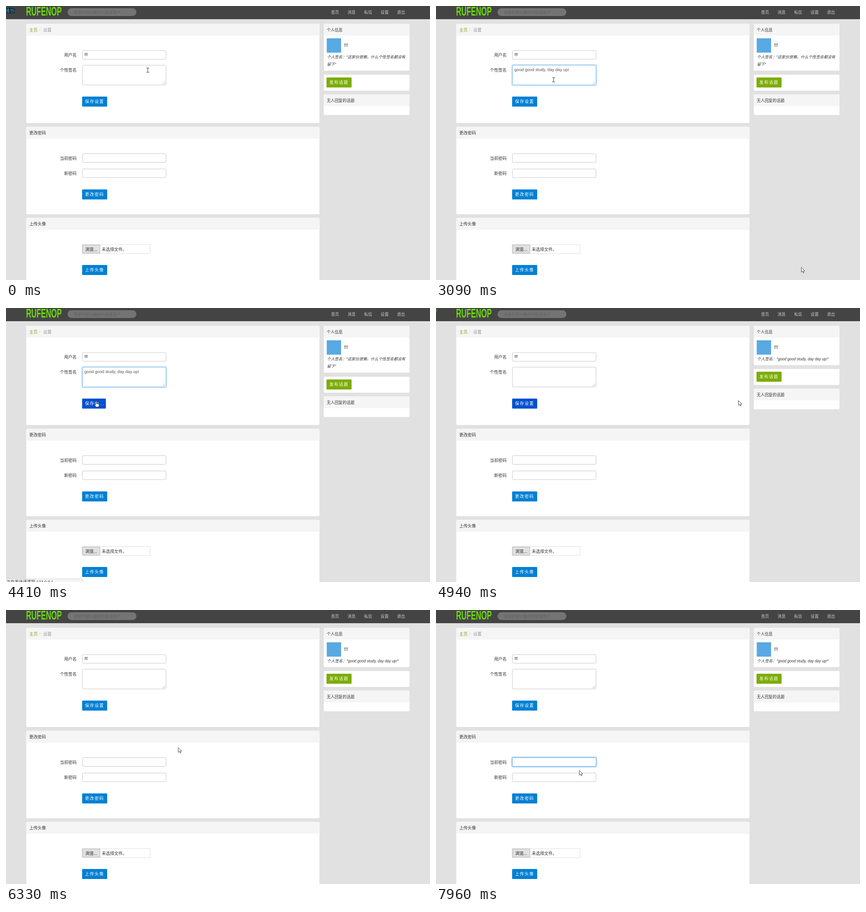
Recreate the animation shown at these times as an HTML page. Size 930 px wide and 602 px high, loop 8000 ms.

```html
<!DOCTYPE html>
<html lang="zh-CN">
<head>
<meta charset="utf-8">
<style>
html, body { margin: 0; width: 100%; height: 100%; overflow: hidden; background: #e1e1e1; }
svg { position: fixed; left: 0; top: 0; display: block; }
text { font-family: "Liberation Sans", "Noto Sans CJK SC", "Noto Sans CJK", sans-serif; white-space: pre; }
.cjk { font-family: "Noto Sans CJK SC", "Noto Sans CJK", sans-serif; }
</style>
</head>
<body>
<svg id="stage" width="930" height="602" viewBox="0 0 930 602"></svg>
<script>
const LOOP = 8000, STEP = 77.2;
const stage = document.getElementById('stage');

function el(tag, attrs, parent = stage) {
  const node = document.createElementNS('http://www.w3.org/2000/svg', tag);
  for (const key in attrs) node.setAttribute(key, attrs[key]);
  return parent.appendChild(node);
}
const group = (parent = stage) => el('g', {}, parent);
const show = (node, on) => node.setAttribute('visibility', on ? 'visible' : 'hidden');

function rect(x, y, width, height, fill, extra = {}, parent) {
  return el('rect', { x, y, width, height, fill, ...extra }, parent);
}
function text(x, y, str, size, fill, extra = {}, parent) {
  const node = el('text', { x, y, 'font-size': size, fill, ...extra }, parent);
  node.textContent = str;
  return node;
}
function card(x, y, w, h, title, parent) {
  rect(x, y, w, h, '#fff', { rx: 2 }, parent);
  if (title === undefined) return;
  el('path', { d: `M${x} ${y + 26}v-24q0-2 2-2h${w - 4}q2 0 2 2v24z`, fill: '#f5f5f5' }, parent);
  text(x + 6.5, y + 16.5, title, x > 600 ? 8.7 : 9.2, '#333', {}, parent);
}
function button(x, y, label, fill, parent) {
  const box = rect(x, y, 55, 22, fill, { rx: 1.5 }, parent);
  const caption = text(x + 6.3, y + 14.4, label, 9.2, '#fff', { 'letter-spacing': 1.3 }, parent);
  return { box, caption };
}
function field(y, h) {
  const glow = rect(166, y - 1.5, 186.5, h + 3, 'none', { rx: 3.5, stroke: '#66afe9', 'stroke-width': 2.5, opacity: 0 });
  const box = rect(167.5, y, 183.5, h, '#fff', { rx: 2.5, stroke: '#c8c8c8', 'stroke-width': 1 });
  return { glow, box };
}
const label = (y, str) => text(155, y, str, 9.2, '#333', { 'text-anchor': 'end' });

// Top bar
rect(0, 0, 930, 29, '#444');
el('text', { transform: 'translate(44 20.5) scale(1 1.7)', 'font-size': 16, 'font-weight': 700, fill: '#6bdc0c' })
  .textContent = 'RUFENOP';
rect(135, 5, 151, 17, '#747474', { rx: 8.5 });
text(149, 16.5, '搜索你感兴趣的内容或用户', 8.5, '#616161');
['首页', '消息', '私信', '设置', '退出'].forEach((s, i) => text(713 + i * 36.2, 16.8, s, 8.8, '#ccc'));
const hint = text(-1.5, 13.8, '播放', 10, '#38a9de', { stroke: '#111', 'stroke-width': 2, 'paint-order': 'stroke' });
const spark = el('path', { d: 'M0 3.5h2M0 6.5h2', stroke: '#35d43a', 'stroke-width': 1.4 });

// Profile form
card(44.5, 39, 643, 218, '');
text(51, 55.5, '主页', 9.2, '#80ab1c');
text(73, 55.5, '/', 9.2, '#ccc');
text(81.5, 55.5, '设置', 9.2, '#999');
label(110.5, '用户名');
field(98, 19);
text(172, 110.3, 'fff', 9.2, '#555');
label(144, '个性签名');
const area = field(130, 43.5);
el('path', { d: 'M343 172l6-6M346 172l3-3', stroke: '#aaa', 'stroke-width': 0.8 });
const motto = 'good good study, day day up!';
const typed = text(172, 143.2, motto, 9.2, '#555');
const save = button(167, 199, '保存设置', '#0080d4');

// Password form
card(44.5, 265.5, 643, 192, '更改密码');
label(337.5, '当前密码');
const oldPass = field(324.5, 19);
label(370.5, '新密码');
field(358, 19);
button(167, 403, '更改密码', '#0080d4');

// Upload form
card(44.5, 465.5, 643, 150, '上传头像');
rect(167, 524, 149, 20, '#fff', { stroke: '#ddd', rx: 1 });
rect(168, 525, 38, 18, '#e1e1e1', { stroke: '#adadad', 'stroke-width': 0.9 });
text(174, 537.5, '浏览...', 9.2, '#111');
text(210, 537.5, '未选择文件。', 9.1, '#333');
button(167, 569, '上传头像', '#0080d4');

// Sidebar
const infoLong = group(), infoShort = group(), lower = group();
const slant = { 'font-style': 'italic' };
card(697, 39, 188, 103, '个人信息', infoLong);
card(697, 39, 188, 86.5, '个人信息', infoShort);
text(704, 114.8, '个人签名:"这家伙很懒,什么个性签名都没有'.replace(/[:,]/g, c => c === ':' ? '：' : '，'),
  8.45, '#333', slant, infoLong);
text(704, 131.3, '留下"', 8.45, '#333', slant, infoLong);
text(704, 114.8, '个人签名：', 8.6, '#333', slant, infoShort);
text(747, 114.8, `"${motto}"`, 8.3, '#333', slant, infoShort);
rect(703.5, 71, 31.5, 31.5, '#58a9e4');
text(741, 90, 'fff', 11.5, '#777');
card(697, 151, 188, 35, undefined, lower);
button(703, 157, '发布话题', '#7cad05', lower);
card(697, 194, 188, 45.5, '无人回复的话题', lower);

// Status bar
const status = group();
rect(-2, 595, 170.5, 12, '#f4f4f4', { stroke: '#ccc', 'stroke-width': 0.8 }, status);
text(1, 605, '正在发送请求到 127.0.0.1...', 9, '#333', {}, status);

// Carets and pointers
const caretA = rect(172, 134, 1, 11, '#222');
const caretB = rect(172, 328, 1, 12, '#222');
const ARROW = 'M.4.4V10.8L2.9 8.6 4.6 12.5 6.3 11.8 4.7 8H8z';
const arrowStyle = { d: ARROW, fill: '#fff', stroke: '#222', 'stroke-width': 0.8 };
const ghost = el('path', { ...arrowStyle, transform: 'translate(801 574)' });
const pointer = group();
const shapes = {
  arrow: el('path', arrowStyle, pointer),
  beam: el('path', { d: 'M-3-4.8h2.2L0-4.2.8-4.8H3M0-4.2V4.2M-3 4.8h2.2L0 4.2.8 4.8H3', fill: 'none', stroke: '#333', 'stroke-width': 1 }, pointer),
  hand: el('path', {
    d: 'M-1.2.7q0-1 1-1t1 1V5l4.2 1q1.6.5 1.3 2L5.4 12.5H-.3L-3.4 8.2q-.4-1.4 1-1.1l1.2 1z',
    fill: '#fff', stroke: '#222', 'stroke-width': 0.8
  }, pointer)
};

// time, x, y
const path = [
  [0, 311, 141], [380, 311, 141], [460, 330, 150], [830, 801, 574], [1150, 789, 114], [1310, 777, 112],
  [1460, 777, 112], [1770, 757, 112], [1930, 757, 112], [2390, 258, 162], [3080, 258, 162], [3160, 258, 162],
  [3860, 200, 208], [4010, 198, 205], [4560, 198, 205], [4900, 663, 203], [4990, 663, 203], [5790, 790, 112],
  [6020, 790, 112], [6310, 377.5, 302], [6390, 377.5, 302], [6770, 305, 335], [7640, 305, 335],
  [7800, 324, 343], [7930, 314, 352], [8000, 314, 352]
];
const clamp = v => Math.max(0, Math.min(1, v));
const ramp = (t, from, to) => clamp((t - from) / (to - from));
const ease = p => p * p * (3 - 2 * p);
const between = (t, from, to) => t >= from && t < to;

function locate(t) {
  const i = Math.max(1, path.findIndex(k => k[0] >= t));
  const [t0, x0, y0] = path[i - 1], [t1, x1, y1] = path[i];
  const p = ease(ramp(t, t0, t1));
  return [x0 + (x1 - x0) * p, y0 + (y1 - y0) * p];
}
const inside = (x, y, l, t, r, b) => x >= l && x <= r && y >= t && y <= b;
function kindAt(x, y) {
  if (inside(x, y, 167, 199, 222, 221)) return 'hand';
  const editable = inside(x, y, 167, 130, 351, 174) || inside(x, y, 167, 324, 351, 344);
  return editable || inside(x, y, 704, 106, 876, 118) ? 'beam' : 'arrow';
}
function mix(a, b, p) {
  return `rgb(${a.map((v, i) => Math.round(v + (b[i] - v) * p))})`;
}
function focus(f, p, strength) {
  f.box.setAttribute('stroke', mix([200, 200, 200], [102, 175, 233], p));
  f.glow.setAttribute('opacity', p * strength);
}

function draw(t) {
  const q = Math.floor((t + 7) / STEP) * STEP;
  const [x, y] = locate(q);
  const kind = kindAt(x, y);
  pointer.setAttribute('transform', `translate(${x.toFixed(1)} ${y.toFixed(1)})`);
  for (const k in shapes) show(shapes[k], k === kind);

  const loaded = t >= 4640, sending = between(t, 4170, 4640);
  show(hint, t < 450);
  show(spark, between(t, 4860, 5010));
  show(ghost, between(t, 830, 3550));
  show(typed, t >= 3090 && !loaded);
  show(status, between(t, 4250, 4640));
  show(infoLong, !loaded);
  show(infoShort, loaded);
  lower.setAttribute('transform', `translate(0 ${loaded ? -17 : 0})`);

  save.caption.textContent = sending ? '保存中...' : '保存设置';
  save.box.setAttribute('width', sending ? 52 : 55);
  const hover = ramp(q, 3700, 3930) - ramp(q, 4960, 5200);
  save.box.setAttribute('fill', mix([0, 128, 212], [0, 80, 208], hover));

  focus(area, loaded ? 0 : ramp(q, 420, 600), 0.25);
  focus(oldPass, ramp(q, 7260, 7480), 0.45);
  show(caretA, between(t, 420, 950) || between(t, 1480, 2000) || between(t, 2540, 3090));
  show(caretB, between(t, 7190, 7720));
}

const start = performance.now();
function tick() {
  draw((performance.now() - start) % LOOP);
  requestAnimationFrame(tick);
}
tick();
</script>
</body>
</html>
```
